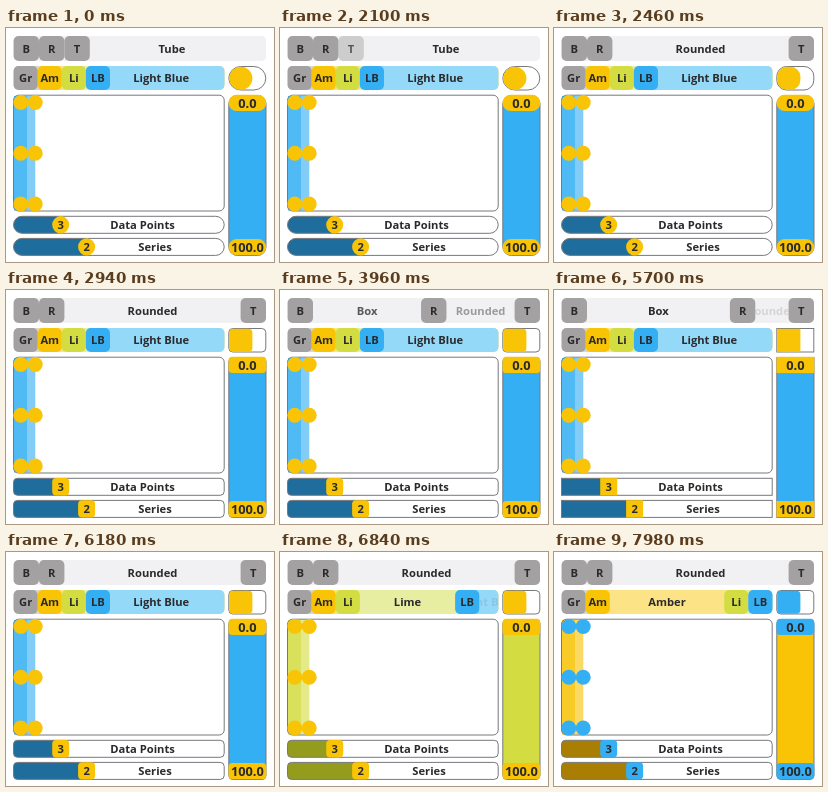
An HTML page that plays this animation: 268x234 px, repeating every 8 s.

```html
<!DOCTYPE html>
<html lang="en">
<head>
<meta charset="utf-8">
<title>Slider styles</title>
<style>
html, body { margin: 0; width: 100%; height: 100%; overflow: hidden; background: #fff; }
svg { display: block; }
text {
  font: 700 11.2px "Open Sans", "Noto Sans", sans-serif;
  fill: #2a2a2c; text-anchor: middle;
}
text.big { font-size: 12.8px; }
</style>
</head>
<body>
<script>
const LOOP = 8000, SLIDE = 220;
const NS = "http://www.w3.org/2000/svg";
const GREY = [163, 161, 162], PALE = [241, 240, 242], LINE = "#76787c";

const THEMES = [
  { main: GREY, dark: [100, 98, 99], pale: [215, 214, 215] },
  { main: [249, 195, 6], dark: [169, 126, 2], pale: [252, 227, 134] },
  { main: [211, 221, 66], dark: [147, 156, 28], pale: [231, 238, 161] },
  { main: [52, 175, 244], dark: [31, 109, 156], pale: [149, 217, 249] }
];
const AMBER = THEMES[1].main, BLUE = THEMES[3].main;
const ACCENTS = [AMBER, BLUE, AMBER, AMBER];
const RADII = [0, 4, 12];

// [time, panel that opens]
const STYLE_STEPS = [[2240, 1], [3835, 0], [5638, 1]];
const THEME_STEPS = [[6680, 2], [7755, 1]];
// [tab, down, up]
const PRESSES = [[2, 2095, 2240], [1, 3800, 3840], [1, 5395, 5500]];

const clamp = v => Math.min(1, Math.max(0, v));
const ease = v => (1 - Math.cos(Math.PI * clamp(v))) / 2;
const rgb = c => `rgb(${c.map(Math.round)})`;
const blend = (colors, w) =>
  rgb([0, 1, 2].map(k => w.reduce((sum, v, i) => sum + v * colors[i][k], 0)));

function set(node, attrs) {
  for (const key in attrs) node.setAttribute(key, attrs[key]);
  return node;
}
function add(parent, tag, attrs) {
  return parent.appendChild(set(document.createElementNS(NS, tag), attrs));
}
function rect(parent, x, y, width, height, attrs) {
  return add(parent, "rect", { x, y, width, height, ...attrs });
}
function label(parent, str, x, y, cls = "") {
  const node = add(parent, "text", { x, y, class: cls });
  node.textContent = str;
  return node;
}

// How far each panel is open at a given time
function weights(count, first, steps, t, duration, delay = 0) {
  let w = Array.from({ length: count }, (_, i) => +(i === first));
  for (const [start, target] of steps) {
    const p = ease((t - start - delay) / duration);
    w = w.map((v, i) => v + ((i === target) - v) * p);
  }
  return w;
}

const stage = add(document.body, "svg", { viewBox: "0 0 268 234", width: "100%", height: "100%" });

class Accordion {
  constructor(y, height, width, tab, items) {
    Object.assign(this, { width, tab });
    const base = height / 2 + 4.2;
    this.parts = items.map(([short, title, main, pale]) => {
      const panel = rect(stage, 0, y, 0, height, { rx: 5, fill: rgb(pale) });
      const view = add(stage, "svg", { y, height, overflow: "hidden" });
      return { panel, view, text: label(view, title, 0, base), short, main };
    });
    for (const part of this.parts) {
      part.grip = add(stage, "g", {});
      part.face = rect(part.grip, 0, y, tab, height, { rx: 5, fill: rgb(part.main) });
      part.mark = label(part.grip, part.short, tab / 2, y + base);
    }
  }
  draw(w, alpha = () => 1) {
    const left = 7.6, right = left + this.width, last = this.parts.length - 1;
    const room = this.width - this.tab * this.parts.length;
    let x = left;
    this.parts.forEach((part, i) => {
      const open = room * w[i], a = alpha(i);
      set(part.grip, { transform: `translate(${x} 0)` });
      set(part.face, { opacity: a });
      set(part.mark, { opacity: (1 + a) / 2 });
      set(part.panel, { x, width: right - x });
      set(part.view, { x: x + this.tab, width: open });
      set(part.text, {
        x: open / 2 - (i === last ? 6 * w[i] : 0),
        opacity: clamp((w[i] - .1) * 1.5)
      });
      x += this.tab + open;
    });
  }
}

const styleBar = new Accordion(8, 25, 252.4, 25.4, [
  ["B", "Box", GREY, PALE], ["R", "Rounded", GREY, PALE], ["T", "Tube", GREY, PALE]
]);
const names = [["Gr", "Grey"], ["Am", "Amber"], ["Li", "Lime"], ["LB", "Light Blue"]];
const themeBar = new Accordion(38, 24, 210.8, 24.1,
  names.map((pair, i) => [...pair, THEMES[i].main, THEMES[i].pale]));

const fills = { main: [], dark: [], accent: [] };
const shaped = [];
const paint = (kind, node) => { fills[kind].push(node); return node; };
const shape = (node, max) => { shaped.push([node, max]); return node; };
const outline = { fill: "none", stroke: LINE, "stroke-width": 1 };

// Toggle
shape(rect(stage, 222.8, 38.5, 37, 23.5, outline), 12);
shape(paint("accent", rect(stage, 223.2, 38.8, 23.2, 23)), 12);

// Chart
[[8, 13, .86], [21, 8.3, .62]].forEach(([x, width, opacity]) =>
  paint("main", rect(stage, x, 68, width, 114.5, { opacity })));
rect(stage, 7.5, 67.2, 210.7, 115.8, { ...outline, rx: 5 });
for (const cy of [74.5, 125.3, 176])
  for (const cx of [14.8, 29.2])
    paint("accent", add(stage, "circle", { cx, cy, r: 7.5 }));

// Horizontal sliders
function slider(y, knob, value, title, textX) {
  shape(paint("dark", rect(stage, 7.5, y, knob - 2, 17)), 8.5);
  shape(rect(stage, 7.5, y, 210.7, 17, outline), 8.5);
  shape(paint("accent", rect(stage, knob - 8.5, y - .2, 17, 17.4)), 8.7);
  label(stage, value, knob, y + 12.7);
  label(stage, title, textX, y + 12.5);
}
slider(188.3, 54.7, "3", "Data Points", 136.5);
slider(210.4, 80.6, "2", "Series", 149);

// Vertical range
shape(paint("main", rect(stage, 222.8, 67.5, 37.2, 160, { stroke: LINE, "stroke-width": 1 })), 8.5);
for (const [y, value] of [[66.8, "0.0"], [211, "100.0"]]) {
  shape(paint("accent", rect(stage, 222.5, y, 37.8, 16.3)), 8.3);
  label(stage, value, 241.4, y + 12.8, "big");
}

function pressAlpha(tab, t) {
  let a = 1;
  for (const [i, down, up] of PRESSES)
    if (i === tab && t >= down) a = Math.min(a, .45 + .55 * clamp((t - up) / 120));
  return a;
}

function draw(t) {
  styleBar.draw(weights(3, 2, STYLE_STEPS, t, SLIDE), i => pressAlpha(i, t));
  themeBar.draw(weights(4, 3, THEME_STEPS, t, SLIDE));

  const form = weights(3, 2, STYLE_STEPS, t, 400, 80);
  const radius = form.reduce((sum, v, i) => sum + v * RADII[i], 0);
  for (const [node, max] of shaped) set(node, { rx: Math.min(radius, max) });

  const tint = weights(4, 3, THEME_STEPS, t, 150);
  const colors = {
    main: blend(THEMES.map(c => c.main), tint),
    dark: blend(THEMES.map(c => c.dark), tint),
    accent: blend(ACCENTS, tint)
  };
  for (const kind in fills)
    for (const node of fills[kind]) set(node, { fill: colors[kind] });
}

const begin = performance.now();
function tick() {
  draw((performance.now() - begin) % LOOP);
  requestAnimationFrame(tick);
}
tick();
</script>
</body>
</html>
```
